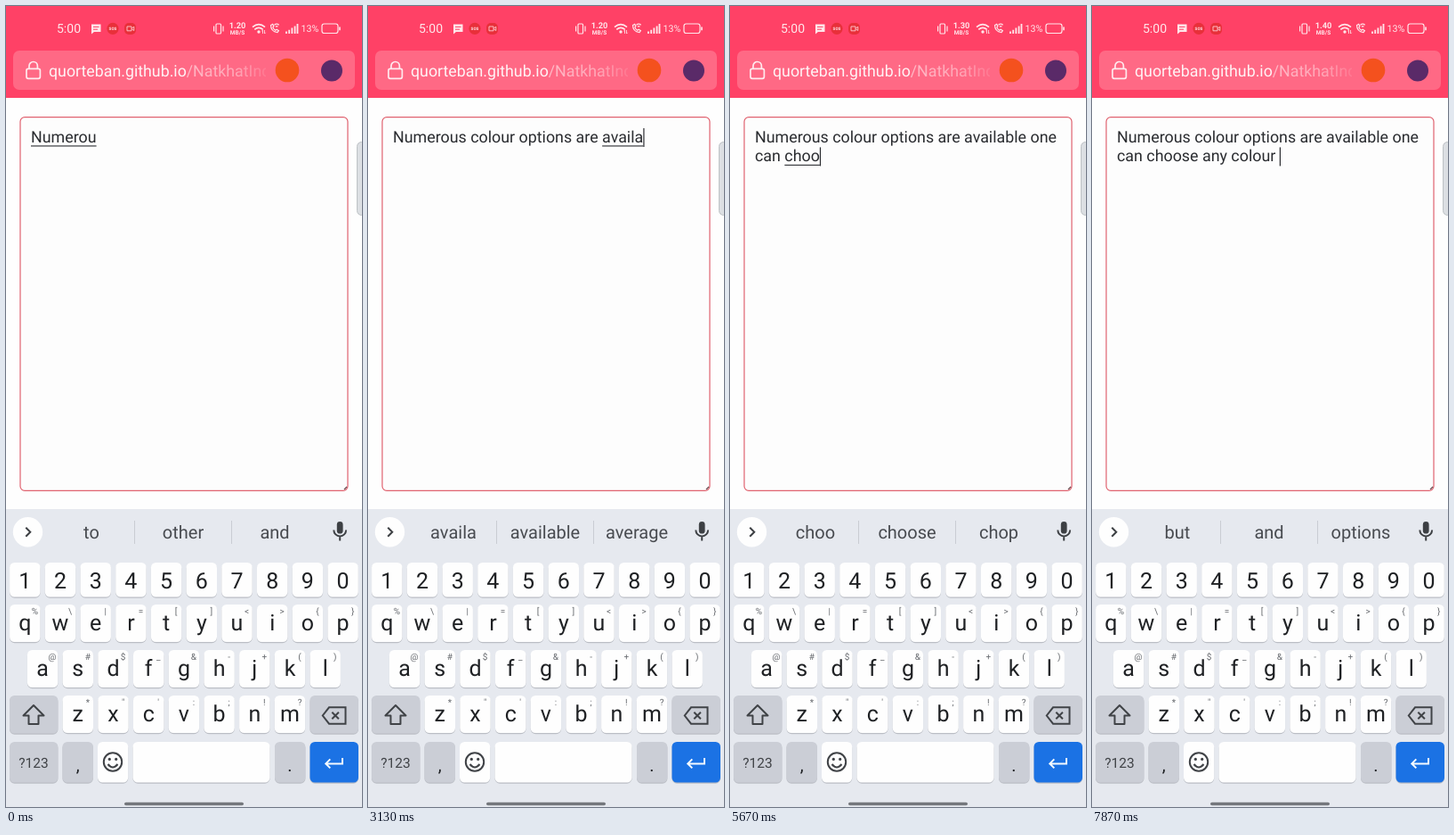
An HTML page that plays this animation: 400x898 px, repeating every 8000 ms.

```html
<!DOCTYPE html>
<html lang="en">
<head>
<meta charset="utf-8">
<title>Typing on a phone</title>
<style>
html, body { margin: 0; width: 100%; height: 100%; overflow: hidden; background: #fefefe; }
svg { display: block; width: 100vw; height: 100vh; font-family: Roboto, sans-serif; text-rendering: geometricPrecision; }
text { white-space: pre; }
</style>
</head>
<body>
<svg id="stage" viewBox="0 0 400 898" preserveAspectRatio="none">
  <defs>
    <linearGradient id="fade" gradientUnits="userSpaceOnUse" x1="203" x2="293" y1="0" y2="0">
      <stop offset="0" stop-color="#ffb9c6"/>
      <stop offset=".65" stop-color="#ffa6b6"/>
      <stop offset="1" stop-color="#ff7690"/>
    </linearGradient>
    <clipPath id="urlClip"><rect x="40" y="50" width="252" height="44"/></clipPath>
  </defs>

  <rect width="400" height="898" fill="#fefefe"/>
  <rect width="400" height="103" fill="#ff4166"/>

  <g fill="#ffe6ea">
    <text x="57" y="30" font-size="14">5:00</text>
    <path d="M96 20.5h10.5v8.5h-7.5l-3 2.5z"/>
    <path d="M98 23.4h6.5M98 26.2h5" stroke="#ff4166" stroke-width="1"/>
    <circle cx="120" cy="25.3" r="6.6" fill="#e8303a"/>
    <text x="120" y="27" font-size="4.6" font-weight="700" text-anchor="middle">SOS</text>
    <rect x="133" y="19" width="13" height="13" rx="5" fill="#e8303a"/>
    <path d="M136 23h5v4.8h-5zM141.4 25l2.4-1.7v4.2l-2.4-1.6" fill="none" stroke="#ffccd2" stroke-width=".9"/>
    <g fill="none" stroke="#ffe6ea" stroke-width="1.2">
      <rect x="236" y="20" width="5.5" height="11" rx="1"/>
      <path d="M233.6 22.5v6M244 22.5v6"/>
      <path d="M277 23.6q7-6 14 0M279.3 26.3q4.7-4 9.4 0" stroke-width="1.7"/>
      <path d="M297.5 21.5q0 7 7.5 8.2l1.4-2-2.3-1.5-1.4 1q-2.2-1.2-2.8-3.3l1-1.2-1.2-2.3z"/>
      <path d="M301.5 21.2q2.6-2.2 5.2 0M303 23.2q1.2-1 2.4 0"/>
      <rect x="355" y="20" width="18" height="10.5" rx="2.5"/>
      <path d="M375 23.4v3.8" stroke-width="1.6"/>
      <path d="M315 31v-2.5M318.2 31v-4.3M321.4 31v-6.4M324.6 31v-8.5M327.5 31v-11" stroke-width="1.8"/>
    </g>
    <circle cx="284" cy="29" r="1.7"/>
    <path d="M288.5 31v-4l-1.2 1.2M290.5 27v4l1.2-1.2" fill="none" stroke="#ffe6ea" stroke-width=".8"/>
    <text id="speed" x="260" y="25" font-size="9.3" font-weight="700" text-anchor="middle">1.20</text>
    <text x="260" y="32" font-size="6.5" font-weight="700" text-anchor="middle">MB/S</text>
    <text x="331.5" y="29" font-size="10.7">13%</text>
  </g>

  <rect x="8" y="50" width="384" height="44" rx="7" fill="#ff6985"/>
  <g fill="none" stroke="#ffeaee" stroke-width="1.7">
    <rect x="23" y="70.3" width="15.4" height="11" rx="2"/>
    <path d="M26 70v-2.8a4.7 4.7 0 0 1 9.4 0v2.8"/>
  </g>
  <g font-size="17.8" clip-path="url(#urlClip)">
    <text x="48" y="78.7" fill="#fff3f5">quorteban.github.io<tspan fill="url(#fade)">/NatkhatInd</tspan></text>
  </g>
  <circle cx="316" cy="72" r="13.3" fill="#f4511e"/>
  <circle cx="366" cy="72.5" r="12" fill="#5a2a68"/>

  <rect x="16" y="124.7" width="368" height="418.6" rx="5" fill="#fdfdfd" stroke="#e0626f" stroke-width="1.2"/>
  <path d="M380 542l3-3" stroke="#6b4b4f" stroke-width="1.3"/>
  <rect x="394.5" y="152.5" width="12" height="82" rx="5" fill="#dcdfe3" stroke="#bdc1c5"/>

  <g font-size="17.85" fill="#2a2c30">
    <text id="line0" x="28" y="153"/>
    <text id="line1" x="28" y="174.4"/>
    <rect id="under" height="1.1"/>
    <rect id="caret" width="1.2" height="21"/>
  </g>

  <rect y="564" width="400" height="334" fill="#e6e9ef"/>
  <circle cx="24.5" cy="589.7" r="16.7" fill="#fefefe"/>
  <path d="M22.3 584.8l5 5-5 5" fill="none" stroke="#3c3f43" stroke-width="2"/>
  <path d="M144.5 577v26M253.5 577v26" stroke="#c9ccd3"/>
  <path id="blank" d="M302.5 577v26" stroke="#c9ccd3"/>
  <g id="words" font-size="20" fill="#484b50" text-anchor="middle"></g>
  <rect x="371.8" y="578" width="6.8" height="13.6" rx="3.4" fill="#3d4044"/>
  <path d="M368.3 587.5a6.9 6.9 0 0 0 13.8 0M375.2 594.5v5" fill="none" stroke="#3d4044" stroke-width="2"/>

  <g id="keys" text-anchor="middle"></g>

  <g fill="none" stroke="#404347" stroke-width="2">
    <path d="M31 784l-11.5 11.5h6v9.5h11v-9.5h6z" stroke-linejoin="round"/>
    <path d="M363 786.3h18.5v18.4H363l-7.2-9.2zM366.3 791.7l7.6 7.6M373.9 791.7l-7.6 7.6"/>
    <circle cx="120" cy="847.5" r="10.2"/>
    <path d="M114.5 850q5.5 6.8 11 0"/>
    <path d="M378 843v6.5h-18.5M364.3 844.4l-5 5 5 5" stroke="#f4faff"/>
  </g>
  <g fill="#404347"><circle cx="116.3" cy="844.4" r="1.6"/><circle cx="123.7" cy="844.4" r="1.6"/></g>
  <rect x="133" y="892.7" width="134" height="3.6" rx="1.8" fill="#74777c"/>
</svg>
<script>
const $ = id => document.getElementById(id);
const LOOP = 8000, SIZE = 17.85, LEFT = 28, LEADING = 21.4;
const LIGHT = '#fefefe', DULL = '#cbced6', BLUE = '#1b72e4';

function set(el, attrs) {
  for (const k in attrs) el.setAttribute(k, attrs[k]);
  return el;
}
function add(parent, tag, attrs, content = '') {
  const el = set(document.createElementNS('http://www.w3.org/2000/svg', tag), attrs);
  el.textContent = content;
  return parent.appendChild(el);
}

// Keyboard
function key(x, y, width, height, fill) {
  add($('keys'), 'rect', { x, y: y + 1.2, width, height, rx: 5.5, fill: '#bbbec5' });
  add($('keys'), 'rect', { x, y, width, height, rx: 5.5, fill });
}
function label(x, y, size, text, fill = '#1f2124') {
  add($('keys'), 'text', { x, y, 'font-size': size, fill }, text);
}
function row(chars, hints, x0, y, h, base) {
  [...chars].forEach((c, i) => {
    const x = x0 + 39.7 * i;
    key(x - 17.2, y, 34.4, h, LIGHT);
    label(x, base, 25, c);
    if (hints) label(x + 11, y + 11, 10, hints[i], '#66696e');
  });
}
row('1234567890', '', 21.3, 624, 38.5, 653);
row('qwertyuiop', '%\\|=[]<>{}', 21.3, 671, 42, 699.5);
row('asdfghjkl', '@#$_&-+()', 41.1, 722, 42, 750.5);
row('zxcvbnm', '*"\':;!?', 80.8, 773, 42, 801.5);
key(4, 773, 54.4, 42.5, DULL);
key(341.5, 773, 54.5, 42.5, DULL);
key(4, 825, 54.4, 45.5, DULL);
key(63.5, 825, 34.4, 45.5, DULL);
key(103, 825, 34.2, 45.5, LIGHT);
key(142.5, 825, 154, 45.5, LIGHT);
key(302, 825, 34.4, 45.5, DULL);
key(341.5, 825, 54.5, 45.5, BLUE);
label(31, 854, 15.5, '?123', '#404347');
label(80.7, 858, 20, ',');
label(319, 858, 20, '.');

// Typing: steady between these [time, characters typed] points
const TEXT = 'Numerous colour options are available one can choose any colour ';
const WRAP = TEXT.indexOf('can');
const pace = [
  [0, 7], [1000, 12], [2200, 24], [3330, 37], [3530, 38], [3870, 38], [4200, 40],
  [5600, 50], [6200, 52], [6470, 53], [6530, 57], [6870, 58], [7670, 64], [LOOP, 64]
];

// Suggestions from a number of characters on; * is the word being typed
const hints = [
  [7, 'to,other,and'], [8, '*,numerous,number'], [9, 'to,other,and'],
  [10, '*,changes,chance'], [11, '*,could,come'], [12, '*,vol,colour'], [14, '*,colour,colours'],
  [16, 'but,and,options'], [17, '*,of,options'], [18, '*,options,open'],
  [24, 'agar,too,for'], [25, '*,and,are'], [28, 'available,not,the'],
  [29, '*,and,available'], [30, '*,available,average'],
  [38, 'on,for,in'], [39, '*,on,of'], [40, 'one,ones,'], [41, '*,ones,once'],
  [42, 'of,can,is'], [43, '*,can,could'], [46, 'be,also,get'],
  [47, '*,choose,change'], [49, '*,choose,chop'], [51, '*,choose,chosen'],
  [53, 'from,any,the'], [57, 'of,one,other'],
  [58, '*,changes,chance'], [59, '*,could,come'], [60, '*,vol,colour'], [62, '*,colour,colours'],
  [64, 'but,and,options']
];

const slots = [96, 199, 302].map(x => add($('words'), 'text', { x, y: 597 }));
const pen = document.createElement('canvas').getContext('2d');
function widthOf(s) {
  pen.font = '100px Roboto, sans-serif';
  return pen.measureText(s).width * SIZE / 100;
}
function typedAt(t) {
  const i = pace.findIndex(p => p[0] > t);
  const [t0, n0] = pace[i - 1], [t1, n1] = pace[i];
  return Math.floor(n0 + (n1 - n0) * (t - t0) / (t1 - t0));
}

function showText(n) {
  const lines = [TEXT.slice(0, Math.min(n, WRAP)), TEXT.slice(WRAP, Math.max(n, WRAP))];
  lines.forEach((s, i) => $('line' + i).textContent = s);
  const at = n > WRAP ? 1 : 0, line = lines[at];
  const wordStart = line.lastIndexOf(' ') + 1;
  const start = widthOf(line.slice(0, wordStart)), end = widthOf(line);
  set($('under'), { x: LEFT + start, y: 156.4 + LEADING * at, width: end - start });
  set($('caret'), { x: LEFT + end, y: 137 + LEADING * at });

  const offer = hints.filter(h => h[0] <= n).pop()[1].split(',');
  offer.forEach((w, i) => slots[i].textContent = w === '*' ? line.slice(wordStart) : w);
  $('blank').setAttribute('visibility', offer[2] ? 'hidden' : 'visible');
}

let shown = -1;
function draw(t) {
  const n = typedAt(t);
  if (n !== shown) showText(shown = n);
  $('caret').setAttribute('visibility', t < 1200 ? 'hidden' : 'visible');
  $('speed').textContent = t < 4670 ? '1.20' : t < 7270 ? '1.30' : '1.40';
}

const begin = performance.now();
function tick() {
  draw((performance.now() - begin) % LOOP);
  requestAnimationFrame(tick);
}
tick();
</script>
</body>
</html>
```
